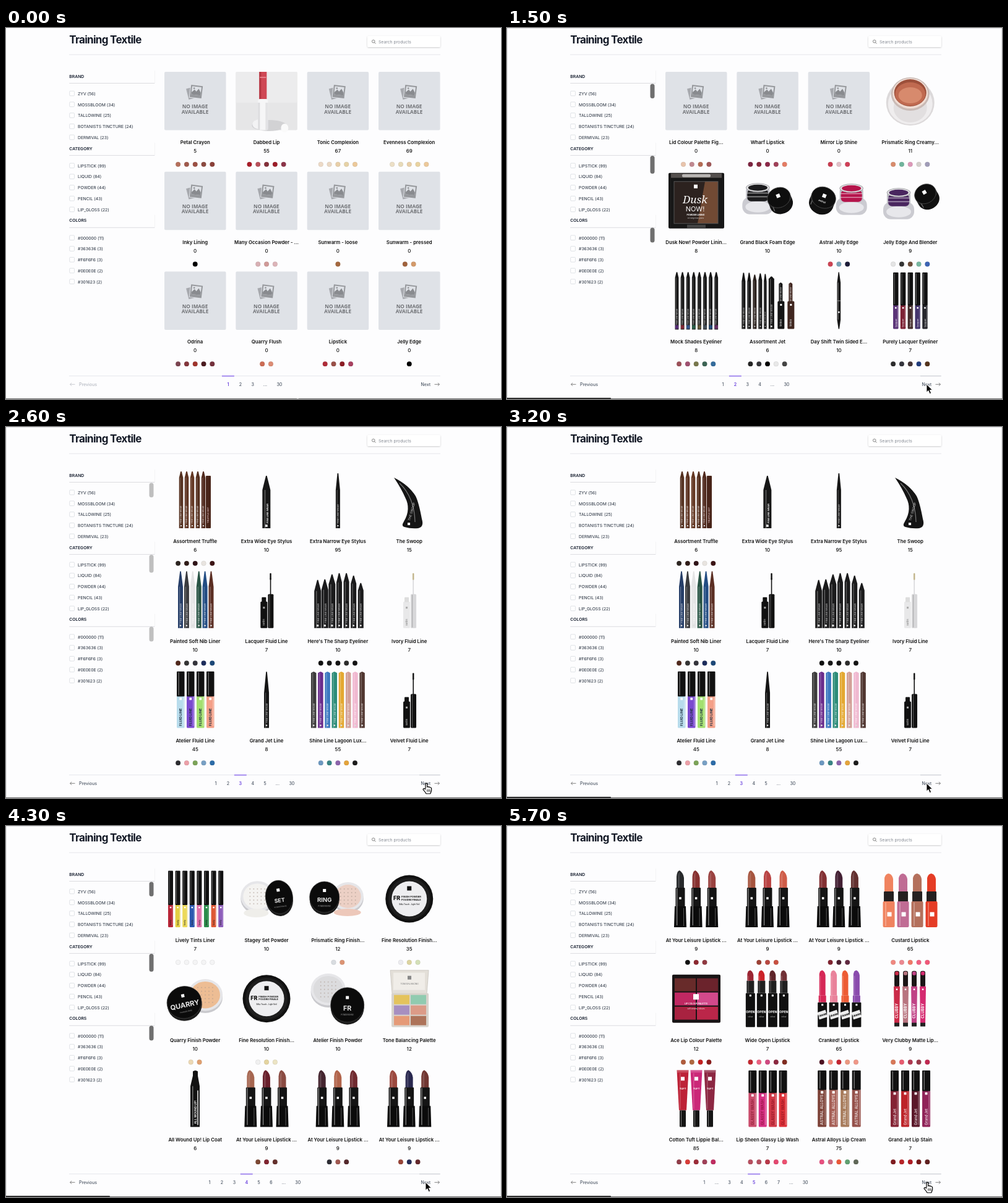
These frames come from a looping animation (800x601 px, 5.8 s). An HTML page:

```html
<!DOCTYPE html>
<html lang="en">
<head>
<meta charset="utf-8">
<title>Product catalogue</title>
<style>
  html, body { margin: 0; width: 100%; height: 100%; overflow: hidden; background: #fdfdfe; }
  svg { display: block; width: 800px; height: 601px; font-family: Inter, "Open Sans", sans-serif; }
</style>
</head>
<body>
<svg id="stage" viewBox="0 0 800 601"></svg>
<script>
const LOOP = 5800, SWITCHES = [0, 1200, 2500, 3900, 5100];

// Shape helpers, all returning SVG markup
const rect = (x, y, w, h, fill, r = 0, more = '') =>
  `<rect x="${x}" y="${y}" width="${w}" height="${h}" rx="${r}" fill="${fill}" ${more}/>`;
const oval = (x, y, rx, ry, fill, more = '') =>
  `<ellipse cx="${x}" cy="${y}" rx="${rx}" ry="${ry}" fill="${fill}" ${more}/>`;
const path = (d, fill, more = '') => `<path d="${d}" fill="${fill}" ${more}/>`;
const group = (x, y, body, turn = 0) =>
  `<g transform="translate(${x} ${y}) rotate(${turn})">${body}</g>`;
const text = (x, y, size, str, fill = '#111', weight = 400, anchor = 'start', more = '') =>
  `<text x="${x}" y="${y}" font-size="${size}" fill="${fill}" font-weight="${weight}" text-anchor="${anchor}" ${more}>${str}</text>`;
const mid = (x, y, size, str, fill, weight = 400, more) => text(x, y, size, str, fill, weight, 'middle', more);
const each = (list, fn) => list.map(fn).join('');
const colors = str => str ? str.split(' ').map(c => '#' + c) : [];
const mark = (x, y, s = 3, fill = '#fff') => rect(x - s / 2, y - s / 2, s, s, fill);
const upText = (x, y, size, str, fill) => group(x, y, text(0, 0, size, str, fill, 700), -90);

// Product pictures, drawn in a 99 x 94 box
const noImage = () => rect(0, 0, 99.5, 94.5, '#dfe2e7', 2) +
  group(46, 34, rect(-9, -9, 18, 18, '#a7a9ae'), -14) +
  group(51.5, 32, rect(-10.5, -11, 21, 22, '#dfe2e7') + rect(-9.5, -10, 19, 20, '#96989c') +
    rect(-7.5, -8, 15, 13.5, '#dfe2e7') + path('M-7.5 5.5V2L-3-3 0 0 3.5-5 7.5 1V5.5Z', '#898b8f') +
    oval(-4, -5, 1.4, 1.4, '#96989c'), 7) +
  each(['NO IMAGE', 'AVAILABLE'], (s, i) =>
    mid(49.5, 59.2 + i * 8.6, 8.2, s, '#717377', 700, 'font-family="Open Sans, sans-serif"'));

const photo = () => rect(0, 0, 99.5, 94.5, '#e6e6e7', 2) + rect(0, 0, 99.5, 50, '#ececed', 2) +
  oval(54, 87, 28, 9, '#d2d2d4') + oval(79, 91, 6, 7, '#fafafa') + oval(39, 85, 12, 8, '#f3f3f4') +
  rect(38, 0, 12, 46, '#cf4754') + rect(38, 0, 3, 46, '#b43642') + rect(39, 8, 10, 2, '#e8808a') +
  rect(36, 44, 16, 50.5, '#f6f6f7', 3) + rect(36, 50, 3, 44, '#dcdcde') + rect(48, 50, 4, 44, '#e3e3e5');

const pen = (x, w, top, bottom, fill, tip = 12, label = '#fff8') =>
  path(`M${x - w / 2} ${bottom}V${top + tip}L${x - .8} ${top}h1.6L${x + w / 2} ${top + tip}V${bottom}Z`, fill) +
  rect(x - w / 4, top + tip, w / 7, bottom - top - tip, '#fff', 0, 'opacity=".28"') +
  upText(x + w * .22, bottom - 8, Math.min(w * .55, 4), 'FINE LINE WEAR', label) +
  mark(x, bottom - 4, w * .3, '#ddd');
const pens = (str, x, step, w, top = 1, bottom = 93, tip = 12) =>
  each(colors(str), (c, i) => pen(x + i * step, w, top, bottom, c, tip));

const tubes = (str, x, step, w, split, label = 'soft gloss', ink = '#fffb') =>
  each(colors(str), (c, i) => {
    const l = x + i * step;
    return rect(l, split - 1, w, 94 - split, c, 1.5) + rect(l, 1.5, w, split - 1.5, '#111', 1) +
      rect(l + w * .2, 3, w * .1, split - 5, '#777') + rect(l + w * .8, split, w * .13, 90 - split, '#fff', 0, 'opacity=".3"') +
      mark(l + w / 2, split + 4, w * .3) + upText(l + w * .66, 90, w * .43, label, ink);
  });

const wand = (body, cap, tip = cap) =>
  rect(40, 50, 11, 43, body, 1.5) + rect(42, 43, 7, 8, cap === '#111' ? '#111' : '#ddd', 1) +
  rect(52, 38, 9, 55, cap, 1.5) + rect(54, 39, 1.2, 53, '#8888') + rect(55.4, 12, 1.6, 27, cap) +
  rect(55, 4, 2.4, 11, tip, 1) + mark(45.5, 60, 3, '#aaa') + upText(47, 89, 4.5, 'satin', '#999');

const pot = (x, y, fill) => group(x, y,
  rect(-25, -4, 50, 28, '#cbcbd1', 12) + oval(0, 12, 20, 9, '#e7e7eb') +
  rect(-19, -20, 38, 22, '#bdbdc4', 5) + rect(-17, -16, 34, 19, fill, 6) +
  each([-11, -5], dy => rect(-18, dy, 36, 1.4, '#fff', 0, 'opacity=".55"')) +
  oval(0, -19, 19, 7, '#dededf', 'stroke="#85858c" stroke-width=".7"') + oval(0, -19, 15.5, 5, fill));
const puck = (x, y, r, turn, word = '') => group(x, y,
  oval(0, 11, r, r * .85, '#111') + rect(-r, 0, 2 * r, 11, '#1a1a1a') + rect(-r * .8, 4, 1.5, 14, '#666') +
  oval(0, 0, r, r * .85, '#0e0e0e', 'stroke="#484848" stroke-width=".8"') +
  mark(0, -3, 6) + mid(0, 8, 4.4, word, '#ddd', 700), turn);
const cap = (x, y, rx, ry, turn = 0, word = '') => group(x, y,
  oval(0, 4, rx, ry, '#1c1c1c') + oval(0, 0, rx, ry, '#0b0b0b', 'stroke="#3c3c3c" stroke-width=".7"') +
  mark(0, -ry * .42, 5) + mid(0, ry * .32, rx * .4, word, '#e6e6e6', 700) +
  mid(0, ry * .62, 2.8, 'POWDER BASE', '#aaa'), turn);
const sifter = (x, y, r, fill) => oval(x, y + 4, r, r * .9, '#c9c9cd') + oval(x, y, r, r * .92, '#e6e6e9') +
  oval(x, y, r - 4, r * .92 - 4, fill) +
  each([...Array(25).keys()], i => oval(x + (i % 5 - 2) * 6, y + ((i / 5 | 0) - 2) * 6, .9, .9, '#a8988c99'));
const compact = () => oval(49.7, 47, 38.5, 38.5, '#111') + oval(49.7, 47, 34, 34, '#1e1e1e') +
  oval(49.7, 47, 28.5, 28.5, '#eeeef0') + mark(49.7, 30, 7, '#111') +
  text(24, 49, 9, 'FR', '#111', 800) + text(37, 45, 4, 'FINISH POWDER', '#222', 700) +
  text(37, 49.5, 4, 'POUDRE FINALE', '#222', 700) + mid(49.7, 57, 3, 'Silky Touch - Light Veil', '#333', 600);

const halo = () => oval(49.7, 50, 39, 37, '#dcd9da') + oval(49.7, 52, 36, 33, '#efedee') +
  oval(49.7, 58, 27, 24, '#e2dfe0') + oval(49.7, 36, 31, 27, '#c9bab5') +
  oval(49.7, 35, 28.5, 24.5, '#f0ddd4') + oval(49.7, 34, 26, 22, '#9c4f3a') +
  oval(49.7, 36, 24.5, 19, '#c06a50') + oval(49.7, 38, 19, 13, '#d78a6d');
const cake = () => rect(5, 2, 90, 90, '#171717', 2) + rect(9, 3, 82, 7, '#55504e') + rect(27, 4, 46, 5, '#b9b6b4', 2) +
  rect(14, 16, 71, 68, '#2c221f') + path('M64 16H85V84H52Z', '#714a34') + rect(14, 16, 71, 68, 'none', 0, 'stroke="#555"') +
  mark(49, 24, 6) + mid(48, 51, 17, 'Dusk', '#fff', 400, 'font-style="italic" font-family="Noto Serif, serif"') +
  mid(48, 64, 11, 'NOW!', '#fff') + mid(49, 71, 3.6, 'POWDER LINING', '#fff', 700) + mid(49, 76, 2.6, 'net weight two grams', '#ddd') +
  rect(35, 86, 30, 5, '#444');
const mock = () => pens('161616 161616 161616 161616 161616 161616 161616 161616', 18.5, 9.1, 5.8, 1, 94, 9) +
  each(colors('552c75 802833 34558c 285c48 655738 46515c 224b79 672d63'), (c, i) => rect(15.9 + i * 9.1, 87, 5.2, 6, c));
const noir = () => each([[11, 6, 2, 14], [20, 6, 2, 14], [29, 6, 5, 10], [38, 6, 3, 11], [46, 4.5, 4, 12], [56, 9, 8, 4]],
    ([x, w, top, tip], i) => pen(x, w, top, 93, i == 2 ? '#2a211d' : '#141414', tip)) +
  each(['#151515', '#40261f'], (c, i) => pen(71 + i * 16, 6, 18, 60, c, 2) + rect(66 + i * 16, 48, 11, 45, c, 1.5) +
    upText(73 + i * 16, 89, 4, 'tinted', '#bbb') + mark(71.5 + i * 16, 54));
const twin = () => path('M48.9 1H50.1L52.5 18V78L50.4 93H49L46.8 78V18Z', '#161616') +
  rect(48, 18, 1, 60, '#777') + rect(46.8, 47, 5.7, 1, '#999') + mark(49.7, 66, 2.5);
const truffle = () => pens('54301f 5d3321 633722 55301f 50291d', 27, 9, 6.5, 1, 93, 10) +
  rect(67, 8, 8, 85, '#482419', 1) + upText(72, 85, 4, 'TRUFFLE SET', '#b99');
const swoop = () => path('M25 11Q49 23 60 41Q65 51 70 78Q74 91 64 93Q52 94 42 91Q36 90 41 82Q53 62 43 43Q37 29 25 11Z', '#151515') +
  path('M34 20Q58 43 59 83', 'none', 'stroke="#777" stroke-width="1.2"') +
  group(51, 81, text(0, 0, 5, 'THE SWOOP', '#ddd'), -74) + mark(49, 86, 4);
const pointed = () => each([15, 14, 6, 4, 4, 8, 20], (top, i) => pen(17 + i * 11.6, i < 3 ? 11 : 9, top, 93, '#1b1b1c', 18 - i));
const palette = () => path('M19 1H81L78 39H22Z', '#e3dfd8', 'stroke="#bbb5ad" stroke-width=".6"') +
  rect(24, 5, 51, 28, '#f0ede8') + mark(50, 13, 6, '#888') + mid(50, 24, 3.3, 'TONE BALANCING', '#777') +
  rect(21, 38, 60, 55, '#d8d3cc', 2) + each(colors('e4c35c 91cbb0 a78fc0 dc9b87 e59a77 ad7359'), (c, i) =>
    rect(25 + i % 2 * 27, 41 + (i / 2 | 0) * 17, 25, 15, c));
const crayon = () => path('M42 93V27L46 10V3Q50 0 54 3V10L57 27V93Z', '#121212') + rect(45, 27, 1.4, 64, '#777') +
  upText(52, 88, 4.7, 'ALL WOUND UP!', '#eee') + rect(53, 34, 2, 56, '#bbb');
const trio = str => each(colors(str), (c, i) => {
  const x = 24 + i * 25.6;
  return path(`M${x - 6} 33V11Q${x - 5} 1 ${x - 1} 1Q${x + 5} 5 ${x + 6} 13V33Z`, c) +
    path(`M${x - 4} 31V11Q${x - 3} 5 ${x - 1} 4V31Z`, '#fff2') + rect(x - 7.5, 29, 15, 33, '#141414', 1) +
    path(`M${x - 9} 59H${x + 9}L${x + 10} 93H${x - 10}Z`, '#0b0b0b') +
    rect(x - 6, 30, 1.3, 60, '#888') + rect(x + 5, 62, 1, 29, '#555') + mark(x, 46, 3.5);
});
const butter = () => each(colors('f0835f c06c94 b4705c e53c25'), (c, i) => {
  const x = 15 + i * 23;
  return path(`M${x - 7} 37V13Q${x - 5} 6 ${x} 6Q${x + 6} 8 ${x + 7} 15V37Z`, c) + rect(x - 8, 35, 16, 18, '#242020', 1) +
    rect(x - 9.5, 51, 19, 42, c, 2) + rect(x - 6, 53, 2, 38, '#fff4') + mark(x + 1, 72, 7);
});
const lipPalette = () => rect(11, 8, 78, 78, '#181415', 2) +
  each(colors('682b2a 6b232c c02862 d2498b a82240 bb2649'), (c, i) =>
    rect(15 + i % 2 * 36, 14 + (i / 2 | 0) * 23, 34, 21, c)) +
  mark(49.5, 44, 9) + mid(49.5, 56, 3.5, 'LIP COLOUR PALETTE', '#fff', 600) + mid(49.5, 64, 3, 'soft creamy colours', '#fff');
const sticks = (str, x, step, collar, base, word) => each(colors(str), (c, i) => {
  const m = x + i * step;
  return path(`M${m - 5} ${collar}V7Q${m - 4} 1 ${m} 1Q${m + 4} 3 ${m + 5} 9V${collar}Z`, c) +
    rect(m - 6, collar, 12, base - collar, collar > 30 ? c : '#202020') + rect(m - 7.5, base, 15, 93 - base, '#101010', 1) +
    rect(m - 4, 10, 1.4, base - 10, '#fff3') + mark(m, base + 4) +
    (collar > 30 ? group(m, 73, rect(-7, -6, 14, 12, '#eee') + mid(0, 2, 4.2, word, '#111', 800), -18)
      : mid(m, 70, 5, word, '#eee', 800) + mid(m, 77, 2.8, 'colour', '#ccc'));
});
const slim = () => each(colors('cb2a48 b87580 c04286 d52a70'), (c, i) => {
  const x = 28 + i * 14;
  return rect(x - 4, 2, 8, 26, '#1b1516', 3) + rect(x - 3, 3, 6, 6, c, 2) + path(`M${x - 5} 27H${x + 5}L${x + 4} 88H${x - 4}Z`, c) +
    rect(x - 4, 86, 8, 6, '#222') + mark(x, 32, 2.5) + upText(x + 2.3, 79, 6, 'CLUBBY', '#fff');
});
const squeeze = () => each(colors('bd2237 cb2878 8c2742'), (c, i) => {
  const x = 28 + i * 22;
  return path(`M${x - 9.5} 1H${x + 9.5}L${x + 6} 66H${x - 6}Z`, c) + rect(x - 9.5, 1, 19, 4, '#fff3') +
    rect(x - 5, 66, 10, 27, '#151515', 1) + rect(x - 3, 67, 1, 25, '#777') + mark(x, 15, 6) +
    mid(x, 33, 4, 'TUFT', '#fff', 700) + rect(x - 5, 6, 1.5, 58, '#fff3');
});

const leisure = 'At Your Leisure Lipstick ...';
const fineFinish = 'Fine Resolution Finish...';

// Each product: name, amount, swatches, picture
const PAGES = [[
  ['Petal Crayon', 5, 'b5705c a05a4c 9c5044 8c4a40 8a4038', noImage],
  ['Dabbed Lip', 55, 'a81c28 b8505a 84303a 9c1c28 8c3448', photo],
  ['Tonic Complexion', 67, 'ecd9c6 ead8c4 e8cfa8 e6d2a6 ecc99a', noImage],
  ['Evenness Complexion', 69, 'ecdfc6 e7dab8 e8cfa8 e9d3a0 ecc99a', noImage],
  ['Inky Lining', 0, '000', noImage],
  ['Many Occasion Powder - ...', 0, 'd8b0b4 d09a98 dcb4b8', noImage],
  ['Sunwarm - loose', 0, 'a4683f', noImage],
  ['Sunwarm - pressed', 0, 'a0623c d49a6a', noImage],
  ['Odrina', 0, '7c4450 84363c a0342c 4c1c20 74303c', noImage],
  ['Quarry Flush', 0, 'cc6c54 dc8c74', noImage],
  ['Lipstick', 0, 'b02c38 9a5048 8c1c24 a84060', noImage],
  ['Jelly Edge', 0, '000', noImage],
], [
  ['Lid Colour Palette Fig...', 0, 'e8c4ac c08890 b46c54 a05858', noImage],
  ['Wharf Lipstick', 0, '7c2440 84283c 8c2848 a04058 e47c64', noImage],
  ['Mirror Lip Shine', 0, 'c83c50 e0c0c8 d04058', noImage],
  ['Prismatic Ring Creamy...', 11, 'd88c6c 70b49c dc98b8 d4d0cc a09cb8', halo],
  ['Dusk Now! Powder Linin...', 8, '', cake],
  ['Grand Black Foam Edge', 10, '', () => pot(34, 45, '#1c1c1e') + puck(68, 42, 19, -22)],
  ['Astral Jelly Edge', 10, 'cc4454 78a4b8 1c1c38', () => pot(70, 46, '#b5144b') + puck(25, 42, 20, 22, 'astral')],
  ['Jelly Edge And Blender', 9, 'e4e4e4 343434 6c4c38 78b8a0 3c64b4', () => pot(31, 53, '#49265f') + puck(74, 36, 18, -30)],
  ['Mock Shades Eyeliner', 8, '9c5058 a05070 78784c 3c6454 346c9c', mock],
  ['Assortment Jet', 6, '242424 343438 000 e8e8e8 444', noir],
  ['Day Shift Twin Sided E...', 10, '', twin],
  ['Purely Lacquer Eyeliner', 7, '2c2c2c 34343c 443434 203c7c 54341c', () => tubes('5b3478 7d2234 432b2a 43336c 26262c', 22, 11.8, 8.5, 55, 'lacquer')],
], [
  ['Assortment Truffle', 6, '2c2420 301c18 301418 e8e4e0 3c1414', truffle],
  ['Extra Wide Eye Stylus', 10, '', () => pen(49.5, 13, 8, 93, '#171717', 23, '#eee')],
  ['Extra Narrow Eye Stylus', 95, '', () => pen(49.7, 7, 4, 93, '#161616', 27)],
  ['The Swoop', 15, '', swoop],
  ['Painted Soft Nib Liner', 10, '50281c 343434 34343c 1c2c5c 1c4878', () => pens('263e68 3a3b3e e4e4e5 285344 234d83 5b2e23', 26, 9.9, 8, 1, 93, 25)],
  ['Lacquer Fluid Line', 7, '', () => wand('#111', '#111')],
  ["Here's The Sharp Eyeliner", 10, '101010 181818 141414 2c2c2c 141414', pointed],
  ['Ivory Fluid Line', 7, '', () => wand('#e8e8e9', '#d8d8da', '#c2b58b')],
  ['Atelier Fluid Line', 45, '2c2c30 eca0a8 7ca458 78a0c4 2c6ca8', () => tubes('b8dcec 7b4bd0 a4e070 f4a088', 20, 16, 12.5, 42, 'FLUID LINE', '#234')],
  ['Grand Jet Line', 8, '', () => pen(49.7, 8, 2, 93, '#151515', 34)],
  ['Shine Line Lagoon Lux...', 55, '6c98c0 388484 8c64ac e4a43c 1c1c1c', () => pens('3c3b3b 6a2c8c 3c78c0 2c8c78 e4a830 d2a098 f0b8d0 503630', 10.5, 11.2, 8.5, 2, 93, 2)],
  ['Velvet Fluid Line', 7, '', () => wand('#111', '#111')],
], [
  ['Lively Tints Liner', 7, 'f4f4f5 f4f4f5 f4f4f5 f4f4f5 f4f4f5', () => tubes('b92638 e3cf43 ecd95b 2c58b0 df70aa 2c8c4c de5835 8d5dba', 6, 11.6, 8, 57, 'lively', '#222b')],
  ['Stagey Set Powder', 10, '', () => sifter(35, 43, 27, '#f4f3f1') + oval(33, 70, 20, 7, '#efeeea') + cap(70, 44, 22, 27, -8, 'SET')],
  ['Prismatic Ring Finish...', 12, 'd8dce0 dc9474', () => sifter(66, 43, 25, '#ecd0c5') + oval(65, 69, 22, 6, '#edc8ba') + cap(28, 44, 24, 25, 0, 'RING')],
  [fineFinish, 35, 'ececf0 dcd4a0 d4e0b8', compact],
  ['Quarry Finish Powder', 10, 'ecd8b4 e0a070', () => sifter(66, 41, 28, '#edbd94') + cap(32, 53, 28, 26, -12, 'QUARRY')],
  [fineFinish, 10, 'f0f0f0 e4d4a0 ece4c4', compact],
  ['Atelier Finish Powder', 10, '', () => sifter(34, 32, 28, '#dcdcde') + cap(65, 57, 27, 28, 0, 'FR')],
  ['Tone Balancing Palette', 12, '', palette],
  ['All Wound Up! Lip Coat', 6, '', crayon],
  [leisure, 9, '7c4834 802430 64302c', () => trio('a66650 691f2b 8a4b42')],
  [leisure, 9, '2c2c34 a05850 54282c', () => trio('44252f b1644b 712b30')],
  [leisure, 9, '984438 242c58 64282c', () => trio('9c493f 29284f 713631')],
], [
  [leisure, 9, '101010 8c2830 903840', () => trio('27292b 87302f 9a4240')],
  [leisure, 9, '9c4034 b84840 c85040', () => trio('a6553f b94343 cf5c48')],
  [leisure, 9, '802430 4c2030 602840', () => trio('833033 432033 63302f')],
  ['Custard Lipstick', 65, 'f08880 ec8890 f07868 f06080 f05878', butter],
  ['Ace Lip Colour Palette', 12, 'b05c3c b06840 c42020 8c1c1c', lipPalette],
  ['Wide Open Lipstick', 7, 'c42830 ec6080 d04880 8c2840 802c20', () => sticks('9b2532 cb2228 5f2429 713036', 22, 18, 18, 38, 'OPEN')],
  ['Cranked! Lipstick', 65, '4c1020 f08878 c42430 ec9880 f09888', () => sticks('d62756 e9829b ed5b34 8a4bad', 23, 18.4, 42, 53, 'CRANK')],
  ['Very Clubby Matte Lip...', 9, 'd87858 e85c70 b03850 983848 c02850', slim],
  ['Cotton Tuft Lippie Bal...', 85, '903c48 d83c38 9c2c38 a04058 c02c60', squeeze],
  ['Lip Sheen Glassy Lip Wash', 7, 'b85060 b45060 b83848 e44870 ec5070', () => tubes('c94b6b d62f83 d13846 dd3038', 19, 16.4, 13, 38, 'GLASSY WASH', '#6018')],
  ['Astral Alloys Lip Cream', 75, 'e85080 d06880 ec5838 60a070 606858', () => tubes('7d4238 a65f56 a77b5b 95514b', 15.5, 18.5, 14, 33, 'ASTRAL ALLOYS')],
  ['Grand Jet Lip Stain', 7, '801c20 b82428 b01c24 741818 602020', () => tubes('842333 bd2429 5a1829 902459', 18, 17, 13, 35, 'Grand Jet')],
]];
const NUMBERS = ['1 2 3 ... 30', '1 2 3 4 ... 30', '1 2 3 4 5 ... 30', '1 2 3 4 5 6 ... 30', '1 ... 3 4 5 6 7 ... 30'];

function card([name, amount, swatches, art], i) {
  const dots = colors(swatches);
  return group(256 + i % 4 * 115.35, 71 + (i / 4 | 0) * 161.7,
    art() + mid(49.7, 117, 7.8, name, '#111', 600) + mid(49.7, 131, 8, amount, '#111', 500) +
    each(dots, (c, k) => oval(49.7 + (k - (dots.length - 1) / 2) * 13.8, 149.8, 3.9, 3.9, c, 'stroke="#0002" stroke-width=".5"')));
}

function pager(page) {
  const items = NUMBERS[page].split(' ');
  const width = s => s === '...' ? 20.8 : s === '30' ? 25 : 19.9;
  let x = 401.7 - items.reduce((sum, s) => sum + width(s), 0) / 2;
  return each(items, s => {
    const w = width(s), on = s == page + 1, left = x;
    x += w;
    return (on ? rect(left, 562.8, w, 2, '#a68df0') : '') +
      mid(left + w / 2, 580.3, 7, s, on ? '#7651e0' : '#4b5563', on ? 700 : 500);
  });
}

const arrow = (x, dir, fill) =>
  path(`M${x} 577.3h${8 * dir}m${-2.6 * dir} -2.4l${2.6 * dir} 2.4l${-2.6 * dir} 2.4`, 'none', `stroke="${fill}" stroke-width=".9"`);

const pageMarkup = (products, i) => `<g class="page">${each(products, card)}${pager(i)}${
  arrow(111.5, -1, i ? '#777' : '#c4c7cd')}${text(118, 580.3, 7, 'Previous', i ? '#4b5563' : '#b4b8c0', 500)}</g>`;

const FACETS = [
  ['BRAND', 'ZYV (56)', 'MOSSBLOOM (34)', 'TALLOWINE (25)', 'BOTANISTS TINCTURE (24)', 'DERMIVAL (23)'],
  ['CATEGORY', 'LIPSTICK (99)', 'LIQUID (84)', 'POWDER (44)', 'PENCIL (43)', 'LIP_GLOSS (22)'],
  ['COLORS', '#000000 (11)', '#363636 (3)', '#F6F6F6 (3)', '#0E0E0E (2)', '#301623 (2)'],
];
const facet = ([head, ...items], i) => group(102.3, 78 + i * 116.9,
  rect(137.6, -9, .8, 20, '#f0f0f3') + rect(0, 11, 138, 1, '#dcdce0') + text(0, 2.6, 6.8, head, '#161e2e', 600) +
  each(items, (s, k) => {
    const y = 28.2 + k * 17.75;
    return rect(.5, y - 4, 7.6, 7.6, '#fff', 1, 'stroke="#d2d6dc" stroke-width=".7"') + text(13.8, y + 2.6, 6.8, s, '#1f2937');
  }));

stage.innerHTML = `<defs><filter id="soft" x="-5%" y="-20%" width="110%" height="150%">
    <feDropShadow dx="0" dy=".8" stdDeviation=".8" flood-opacity=".22"/></filter></defs>` +
  rect(0, 0, 800, 601, '#fdfdfe') +
  text(102.3, 25.2, 17, 'Training Textile', '#131926', 700, 'start', 'letter-spacing="-.7"') +
  rect(584, 13, 118, 18, '#fff', 2, 'filter="url(#soft)"') +
  path('M595.4 23.4l2 2', 'none', 'stroke="#777" stroke-width="1"') + oval(593.8, 21.7, 2.3, 2.3, 'none', 'stroke="#777" stroke-width=".9"') +
  text(602, 25, 6.8, 'Search products', '#868b94') +
  rect(102, 42.6, 600, 1, '#e5e7eb') + each(FACETS, facet) +
  `<g id="bars">${each([[90.5, 23.5], [207, 29], [323.5, 24]], ([y, h]) => rect(231.5, y, 7, h, '#6f6f6f', 3.5))}</g>` +
  rect(102, 563.2, 600, 1, '#e5e7eb') + rect(668, 563, 33.5, 1.3, '#cfd2d8', 0, 'id="hover"') +
  each(PAGES, pageMarkup) +
  text(670.5, 580.3, 7, 'Next', '#4b5563', 500) + arrow(692.5, 1, '#777') +
  rect(.4, .4, 799.2, 620, 'none', 0, 'id="edge" stroke="#dedee1" stroke-width=".8"') +
  rect(0, 600, 800, 1, '#6b6b6b') + rect(-2, 599, 0, 4, '#303030', 1, 'id="status"') +
  `<g id="arrow">${path('M0 0V13.2L3 10.4 5.2 15.6 7.6 14.6 5.4 9.6H9.6Z', '#000', 'stroke="#fff" stroke-width=".9"')}</g>
  <g id="hand" transform="translate(673 576)">${path('M5 10V2.2Q6.4 0 7.8 2.2V7Q9.2 6 10.2 7.4Q11.8 6.6 12.6 8Q14.6 7.8 14.6 9.8V13Q14 15 12.8 18H6Q4.4 14.6 1.2 11.6Q1 9.2 3.4 9.8L5 11.4', '#fff', 'stroke="#000" stroke-width="1.2"')}${
    path('M7.8 11v4M10 11v4M12.1 11v4', 'none', 'stroke="#000" stroke-width=".8"')}</g>`;

const $ = id => document.getElementById(id);
const pageNodes = document.querySelectorAll('.page');
const show = (node, on) => node.setAttribute('visibility', on ? 'visible' : 'hidden');

function statusWidth(t, page, since) {
  if (!page) return t < 700 ? 0 : t < 1000 ? 168 : 255;
  if (page > 1 && since < 200) return 0;
  return since < 800 ? 168 : 255;
}

function draw(now) {
  const t = Math.floor(now % LOOP / 100) * 100;
  const page = SWITCHES.findLastIndex(s => t >= s), since = t - SWITCHES[page];
  pageNodes.forEach((node, i) => show(node, i === page));

  const fade = since < 200 ? .43 : since < 500 ? 1 : since < 600 ? .4 : 0;
  $('bars').setAttribute('opacity', page ? fade : 0);
  const width = statusWidth(t, page, since);
  $('status').setAttribute('width', width ? width + 2 : 0);
  show($('edge'), t >= 700);
  show($('hover'), t >= 500);

  const p = Math.min(t / 600, 1), ease = p * p * (3 - 2 * p);
  const pointing = (t >= 2500 && t < 2800) || t >= 5500;
  $('arrow').setAttribute('transform', `translate(${471 + 207 * ease} ${599.5 - 22.5 * ease})`);
  show($('arrow'), !pointing);
  show($('hand'), pointing);
}

function tick() {
  draw(performance.now());
  requestAnimationFrame(tick);
}
tick();
</script>
</body>
</html>
```
